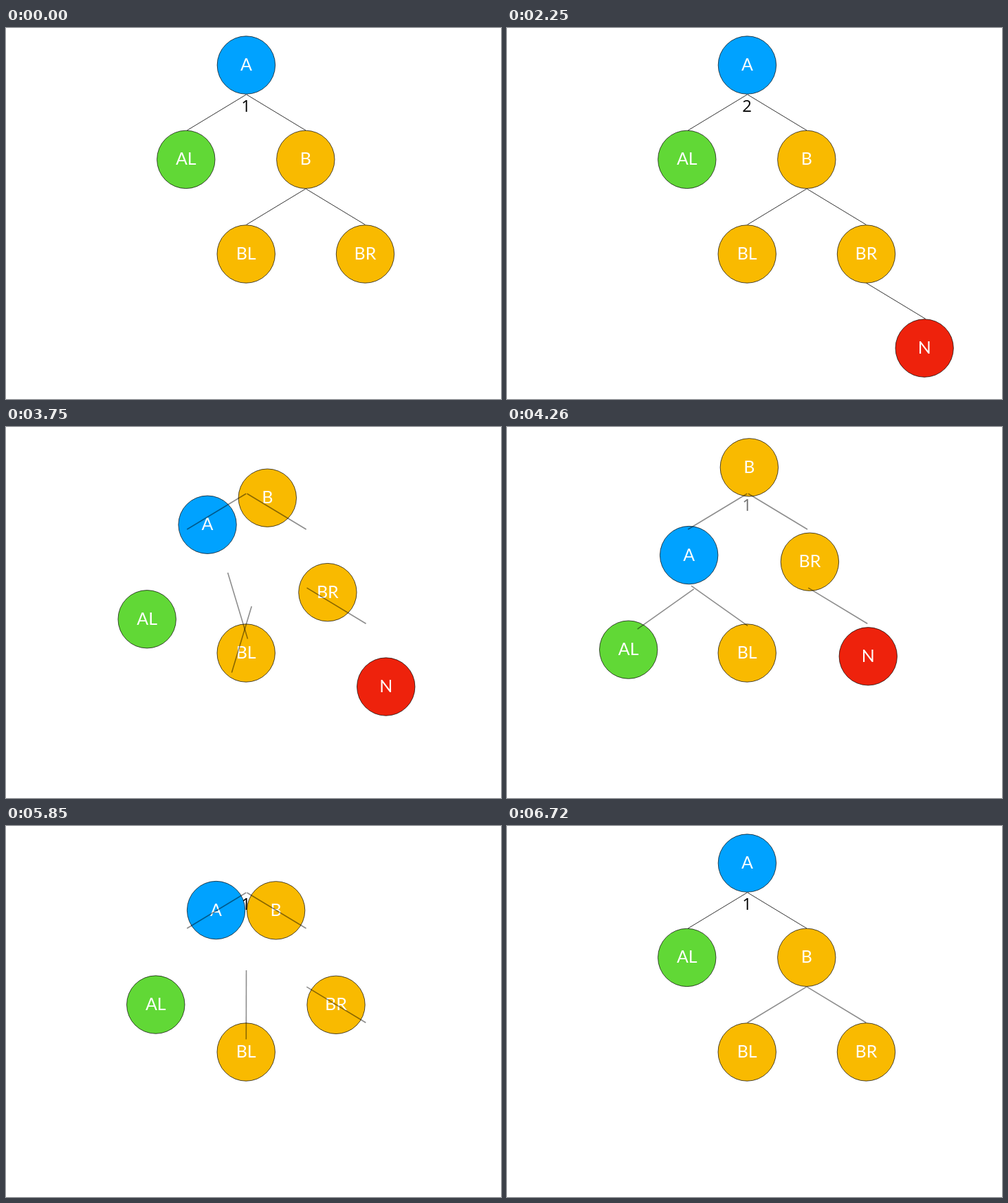
Animation of 720x540 px, one loop 6.75 s. Source, as an HTML page with a canvas:

```html
<!DOCTYPE html>
<html lang="en">
<head>
<meta charset="utf-8">
<title>Tree rotation</title>
<style>
  html, body { margin: 0; width: 100%; height: 100%; overflow: hidden; background: #fff; }
  canvas { display: block; }
</style>
</head>
<body>
<canvas id="stage" width="720" height="540"></canvas>
<script>
const ctx = document.getElementById('stage').getContext('2d');
const HOLD = 450, MOVE = 1800, STEP = HOLD + MOVE;
const BLUE = '#00a2ff', GREEN = '#61d836', AMBER = '#f9ba00', RED = '#ee220c';
const ROWS = [54, 191.4, 329, 466];
const DOWN = 31.2, UP = 180 - DOWN, HALF = 50.3;

// Each part lists its pose in the three scenes; null means absent.
const nodes = [
  { name: 'A', color: BLUE, poses: [[349.4, ROWS[0]], [349.4, ROWS[0]], [261.6, ROWS[1]]] },
  { name: 'AL', color: GREEN, poses: [[261.8, ROWS[1]], [261.8, ROWS[1]], [173.6, ROWS[2]]] },
  { name: 'B', color: AMBER, poses: [[435.8, ROWS[1]], [435.8, ROWS[1]], [349.3, ROWS[0]]] },
  { name: 'BL', color: AMBER, poses: [[349.2, ROWS[2]], [349.2, ROWS[2]], [349.2, ROWS[2]]] },
  { name: 'BR', color: AMBER, poses: [[522.5, ROWS[2]], [522.5, ROWS[2]], [437.4, ROWS[1]]] },
  { name: 'N', color: RED, poses: [null, [607.2, ROWS[3]], [522.3, ROWS[2]]] }
];

// Edge poses are centre x, centre y and angle in degrees.
const edges = [
  { top: true, poses: [[306.3, 123, UP], [306.3, 123, UP], [306.3, 123, UP]] },
  { top: true, poses: [[393, 123, DOWN], [393, 123, DOWN], [394, 123, DOWN]] },
  { poses: [[392.7, 260.2, UP], [392.7, 260.2, UP], [306, 260.2, DOWN]] },
  { poses: [[479.3, 260.2, DOWN], [479.3, 260.2, DOWN], [481.3, 260.2, DOWN]] },
  { poses: [null, [565.7, 397.3, DOWN], [218.5, 260.2, UP]] }
];
const balances = ['1', '2', '1'];

const clamp = v => Math.min(1, Math.max(0, v));
const fadeOut = u => clamp(1 - u / 0.3);
const fadeIn = u => clamp((u - 0.7) / 0.3);

// Symmetric ease-in-out, cubic-bezier(.42, 0, .58, 1)
function ease(u) {
  let low = 0, high = 1;
  for (let i = 0; i < 24; i++) {
    const s = (low + high) / 2, r = 1 - s;
    if (1.26 * s * r * r + 1.74 * s * s * r + s ** 3 < u) low = s; else high = s;
  }
  return low * low * (3 - 2 * low);
}

function blend(poses, scene, u) {
  const from = poses[scene], to = poses[(scene + 1) % 3];
  if (!from && !to) return null;
  if (!from) return { pose: to, alpha: fadeIn(u) };
  if (!to) return { pose: from, alpha: fadeOut(u) };
  const p = ease(u);
  return { pose: from.map((v, i) => v + (to[i] - v) * p), alpha: 1 };
}

function drawText(text, x, y, font, color) {
  ctx.font = font;
  ctx.fillStyle = color;
  ctx.fillText(text, x, y);
}

function drawBalance(scene, u) {
  const draw = (text, alpha) => {
    ctx.globalAlpha = alpha;
    drawText(text, 349.2, 121.5, '24px "Open Sans", sans-serif', '#000');
  };
  const from = balances[scene], to = balances[(scene + 1) % 3];
  if (from === to) return draw(from, 1);
  draw(from, fadeOut(u));
  draw(to, fadeIn(u));
}

function drawNode({ name, color, poses }, scene, u) {
  const state = blend(poses, scene, u);
  if (!state) return;
  const [x, y] = state.pose;
  ctx.globalAlpha = state.alpha;
  ctx.beginPath();
  ctx.arc(x, y, 42.2, 0, 2 * Math.PI);
  ctx.fillStyle = color;
  ctx.fill();
  ctx.lineWidth = 1;
  ctx.strokeStyle = 'rgba(0,0,0,.7)';
  ctx.stroke();
  drawText(name, x, y + 8, '25px Lato, sans-serif', '#fff');
}

function drawEdge({ top, poses }, scene, u, moving) {
  const state = blend(poses, scene, u);
  if (!state) return;
  const [x, y, degrees] = state.pose;
  const angle = degrees * Math.PI / 180;
  const dx = HALF * Math.cos(angle), dy = HALF * Math.sin(angle);
  const soft = moving && !(top && u > 0.97);
  ctx.globalAlpha = state.alpha;
  ctx.lineWidth = soft ? 1.6 : 1;
  ctx.strokeStyle = soft ? 'rgba(0,0,0,.45)' : 'rgba(0,0,0,.8)';
  ctx.beginPath();
  ctx.moveTo(x - dx, y - dy);
  ctx.lineTo(x + dx, y + dy);
  ctx.stroke();
}

function render(now) {
  const time = now % (3 * STEP);
  const scene = Math.floor(time / STEP);
  const local = time - scene * STEP;
  const moving = local >= HOLD;
  const u = clamp((local - HOLD) / MOVE);
  ctx.globalAlpha = 1;
  ctx.fillStyle = '#fff';
  ctx.fillRect(0, 0, 720, 540);
  ctx.textAlign = 'center';
  drawBalance(scene, u);
  nodes.forEach(node => drawNode(node, scene, u));
  edges.forEach(edge => drawEdge(edge, scene, u, moving));
}

const start = performance.now();
function tick() {
  render(performance.now() - start);
  requestAnimationFrame(tick);
}
tick();
</script>
</body>
</html>
```
